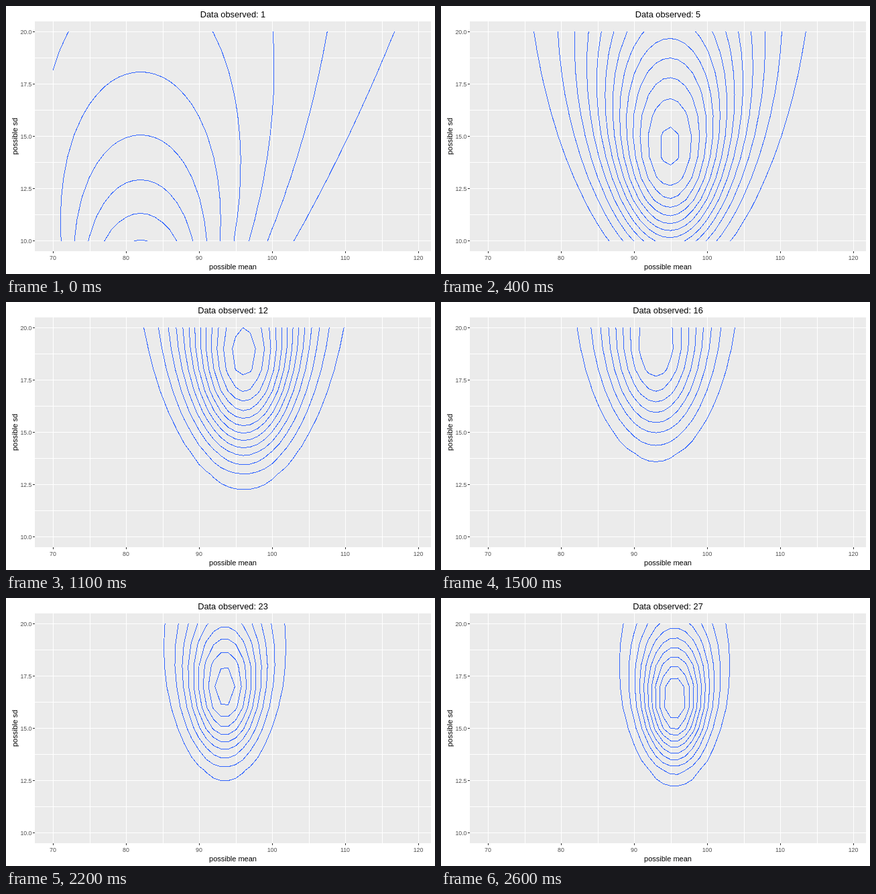
An HTML page that plays this animation: 640 by 400 pixels, repeating every 2700 ms.

```html
<!DOCTYPE html>
<html lang="en">
<head>
<meta charset="utf-8">
<title>Posterior contours</title>
<style>
  html, body { margin: 0; width: 100%; height: 100%; overflow: hidden; background: #fff; }
  svg { display: block; width: 640px; height: 400px; font-family: "Liberation Sans", Arial, sans-serif; }
  .tick { font-size: 8.8px; fill: #4d4d4d; }
  .axis { font-size: 11px; }
  .title { font-size: 12.8px; }
</style>
</head>
<body>
<svg viewBox="0 0 640 400">
  <g shape-rendering="crispEdges" fill="none">
    <rect x="43" y="23" width="591" height="343" fill="#ebebeb"/>
    <path id="grid" stroke="#fff"/>
    <path id="ticks" stroke="#333"/>
    <path id="lines" stroke="#3366ff" stroke-linecap="round"/>
  </g>
  <g id="labels" class="tick"></g>
  <text class="axis" x="338.5" y="393" text-anchor="middle">possible mean</text>
  <text class="axis" transform="translate(17 194.5) rotate(-90)" text-anchor="middle">possible sd</text>
  <text id="title" class="title" x="338.5" y="17" text-anchor="middle"></text>
</svg>
<script>
const STEP = 100;
// null: a step that brings no new observation
const DATA = [82, 93, 99.5, 80, 120, 110.2, 136.8, 73, 96.5, null, 76, 90.5, 111, 79.8,
  85.3, 61.5, 82.85, null, 95.85, 105.85, 87.85, 106.85, 89.85, 113.3, 105.3, 107.8, 98.2];
const MEANS = Array.from({ length: 61 }, (_, i) => 70 + i);
const SDS = Array.from({ length: 11 }, (_, i) => 10 + i);
const px = m => 70 + (m - 70) * 10.9;
const py = s => 350.5 - (s - 10) * 31.2;
const $ = id => document.getElementById(id);

function drawAxes() {
  let grid = '', ticks = '', labels = '';
  for (let m = 70; m <= 120; m += 5) {
    const x = Math.round(px(m) + 0.1) + 0.5;
    grid += `M${x} 23V366`;
    if (m % 10) continue;
    ticks += `M${x} 366v3`;
    labels += `<text x="${px(m)}" y="379" text-anchor="middle">${m}</text>`;
  }
  for (let s = 10; s <= 20; s += 1.25) {
    const y = Math.floor(py(s)) + 0.5;
    grid += `M43 ${y}H634`;
    if (s % 2.5) continue;
    ticks += `M40 ${y}h3`;
    labels += `<text x="38.5" y="${y + 3.5}" text-anchor="end">${s.toFixed(1)}</text>`;
  }
  $('grid').setAttribute('d', grid);
  $('ticks').setAttribute('d', ticks);
  $('labels').innerHTML = labels;
}

// Normal posterior on the grid under a flat prior, summing to 1
function posterior(xs) {
  const n = xs.length;
  const mean = xs.reduce((a, x) => a + x, 0) / n;
  const ss = xs.reduce((a, x) => a + (x - mean) ** 2, 0);
  const z = SDS.map(s => MEANS.map(m =>
    Math.exp(n * Math.log(15 / s) - (ss + n * (m - mean) ** 2) / (2 * s * s))));
  const total = z.flat().reduce((a, v) => a + v, 0);
  return z.map(row => row.map(v => v / total));
}

// Round level spacing for about ten levels
function levelStep(max) {
  const cell = max / 10, base = 10 ** Math.floor(Math.log10(cell)), c = cell / base;
  return base * (c > 7 ? 10 : c > 2.8 ? 5 : c > 1.4 ? 2 : 1);
}

function contours(z) {
  const max = Math.max(...z.flat()), step = levelStep(max);
  let d = '';
  for (let level = step; level < max; level += step) {
    for (let j = 0; j < SDS.length - 1; j++) {
      for (let i = 0; i < MEANS.length - 1; i++) {
        const corners = [[i, j], [i + 1, j], [i + 1, j + 1], [i, j + 1]];
        const hits = [];
        corners.forEach(([i0, j0], k) => {
          const [i1, j1] = corners[(k + 1) % 4], a = z[j0][i0], b = z[j1][i1];
          if (a >= level === b >= level) return;
          const f = (level - a) / (b - a);
          hits.push(px(70 + i0 + f * (i1 - i0)).toFixed(2) + ' ' + py(10 + j0 + f * (j1 - j0)).toFixed(2));
        });
        for (let k = 0; k + 1 < hits.length; k += 2) d += `M${hits[k]}L${hits[k + 1]}`;
      }
    }
  }
  return d;
}

drawAxes();
const paths = DATA.map((_, i) => contours(posterior(DATA.slice(0, i + 1).filter(x => x !== null))));
let shown = -1;

function show(now) {
  const k = Math.floor(now / STEP) % DATA.length;
  if (k !== shown) {
    shown = k;
    $('lines').setAttribute('d', paths[k]);
    $('title').textContent = 'Data observed: ' + (k + 1);
  }
}

const start = performance.now();
function tick() {
  show(performance.now() - start);
  requestAnimationFrame(tick);
}
tick();
</script>
</body>
</html>
```
